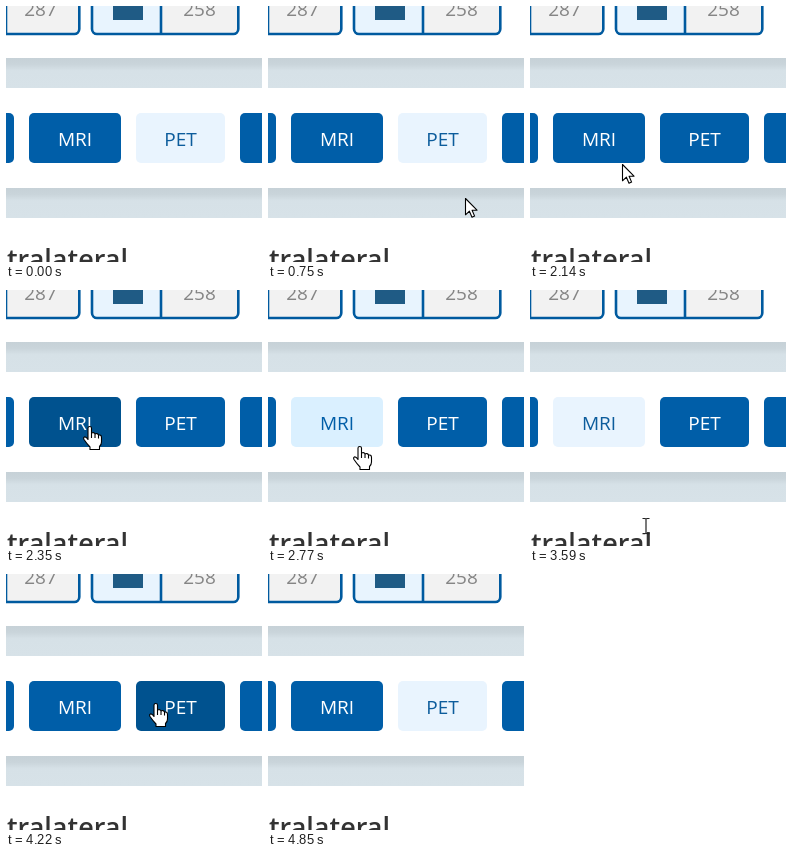
These frames come from a looping animation (256x256 px, 5.62 s). An HTML page:

```html
<!DOCTYPE html>
<html lang="en">
<head>
<meta charset="utf-8">
<title>Filter buttons</title>
<style>
  html, body { margin: 0; width: 100%; height: 100%; overflow: hidden; background: #fff; }
  svg { display: block; width: 100%; height: 100%; }
  text { font-family: "Open Sans", "Noto Sans", sans-serif; font-size: 19px; }
  .mid { text-anchor: middle; }
  .count { fill: #858585; }
  .heading { font-size: 27px; font-weight: 600; fill: #333; text-anchor: end; }
  .edge { fill: none; stroke: #005a9f; stroke-width: 2.6; }
  .cursor { fill: #fff; stroke: #000; stroke-width: 1.1; stroke-linejoin: round; }
</style>
</head>
<body>
<svg viewBox="0 0 256 256">
  <defs>
    <linearGradient id="shade" x1="0" y1="0" x2="0" y2="1">
      <stop offset="0" stop-color="#c6d1d7"/>
      <stop offset=".22" stop-color="#cad5db"/>
      <stop offset=".42" stop-color="#d6e1e7"/>
      <stop offset="1" stop-color="#d7e2e8"/>
    </linearGradient>
  </defs>
  <rect width="256" height="256" fill="#fff"/>
  <rect y="52" width="256" height="30" fill="url(#shade)"/>
  <rect y="182" width="256" height="30" fill="url(#shade)"/>

  <rect x="-74" y="-30" width="147.3" height="58" rx="5" fill="#f2f2f2"/>
  <rect x="-74" y="-30" width="147.3" height="58" rx="5" class="edge"/>
  <path d="M0 0V28" class="edge"/>
  <text x="34.5" y="10" class="mid count">287</text>

  <rect x="86" y="-30" width="146.3" height="58" rx="5" fill="#f2f2f2"/>
  <path d="M155 -30V28H91Q86 28 86 23V-30Z" fill="#e8f4fe"/>
  <rect x="86" y="-30" width="146.3" height="58" rx="5" class="edge"/>
  <path d="M155 0V28" class="edge"/>
  <rect x="107" y="-16" width="30" height="30" fill="#1f5b85"/>
  <text x="193.5" y="10" class="mid count">258</text>

  <rect x="-80" y="107" width="88" height="50" rx="5" fill="#005ea8"/>
  <rect x="234" y="107" width="90" height="50" rx="5" fill="#005ea8"/>
  <g id="mri">
    <rect x="23" y="107" width="92" height="50" rx="5"/>
    <text x="69" y="140" class="mid">MRI</text>
  </g>
  <g id="pet">
    <rect x="130" y="107" width="89" height="50" rx="5"/>
    <text x="174.5" y="140" class="mid">PET</text>
  </g>
  <text x="122" y="263" class="heading">Contralateral</text>

  <path id="arrow" class="cursor" d="M.5 .5V16.8L4.4 13.2L7 19.2L9.6 18.1L7.1 12.2H12Z"/>
  <path id="hand" class="cursor" d="M-2 2Q-2 .5 -.3 .5Q1.5 .5 1.5 2V8Q1.5 6.5 3.3 6.6Q5 6.8 5 8.3Q5.5 7.4 7 7.6Q8.5 8 8.5 9.3Q9.4 8.6 10.6 9.3Q11.5 10 11.5 11.5V16Q11.5 18.5 9.5 20.5V23.5H0V21Q-3 18 -6 13.5Q-7 11.5 -5.5 10.9Q-4 10.5 -2 13.5ZM1.5 8V12M5 8.5V12M8.5 9.5V12.5"/>
  <path id="beam" fill="none" stroke="#222" stroke-width="1.2" d="M-3.5 -7.5H-1L0 -6.7L1 -7.5H3.5M0 -6.7V7M-3.5 7.7H-1L0 7L1 7.7H3.5"/>
</svg>
<script>
const LOOP = 5620;
const $ = id => document.getElementById(id);

// state: [fill, label]
const look = {
  on: ['#005ea8', '#fff'],
  onHover: ['#00528f', '#fff'],
  fade: ['#6da1c7', '#fff'],
  off: ['#e9f4fe', '#0c5c9c'],
  offHover: ['#daf0ff', '#005ea8']
};

const states = {
  mri: [[0, 'on'], [2210, 'onHover'], [2490, 'fade'], [2560, 'offHover'], [2840, 'off'],
        [3870, 'offHover'], [4080, 'fade'], [4150, 'onHover'], [4220, 'on']],
  pet: [[0, 'off'], [890, 'offHover'], [1100, 'onHover'], [1370, 'on'],
        [4220, 'onHover'], [4430, 'fade'], [4500, 'offHover'], [4710, 'off']]
};

// Pointer legs: start, end, step length, keys of [step, x, y]
const legs = [
  [490, 1300, 67.5, [[0, 217, 230], [5, 184, 166], [6, 180, 150], [8, 174, 137]]],
  [1300, 1500, 67, [[0, 172, 162], [2, 170, 226]]],
  [1930, 2700, 70, [[0, 144, 236], [3, 92, 158], [4, 86, 143], [6, 84, 136]]],
  [2700, 3050, 70, [[0, 87, 144], [1, 92, 156], [4, 127, 236]]],
  [3590, 4220, 70, [[0, 116, 236], [3, 94, 160], [4, 89, 146], [7, 90, 134]]],
  [4220, 4640, 70, [[0, 150, 129], [2, 168, 132]]],
  [4640, 4850, 70, [[0, 171, 162], [2, 174, 228]]]
];

function along(keys, step) {
  const n = keys.findIndex(k => k[0] > step);
  if (n < 0) return keys[keys.length - 1].slice(1);
  const a = keys[n - 1], b = keys[n];
  const u = (step - a[0]) / (b[0] - a[0]);
  return [1, 2].map(i => Math.round(a[i] + (b[i] - a[i]) * u));
}

function pointerKind(x, y) {
  if (y < 157) return 'hand';
  return x < 122 && y > 228 ? 'beam' : 'arrow';
}

function draw(t) {
  for (const id in states) {
    const name = states[id].filter(s => s[0] <= t).pop()[1];
    const [box, label] = $(id).children;
    box.setAttribute('fill', look[name][0]);
    label.setAttribute('fill', look[name][1]);
  }
  const leg = legs.find(l => t >= l[0] && t < l[1]);
  const pos = leg && along(leg[3], Math.floor((t - leg[0]) / leg[2]));
  const kind = pos && pointerKind(...pos);
  for (const id of ['arrow', 'hand', 'beam']) {
    $(id).style.display = id === kind ? '' : 'none';
    if (id === kind) $(id).setAttribute('transform', `translate(${pos})`);
  }
}

const start = performance.now();
function tick() {
  draw((performance.now() - start) % LOOP);
  requestAnimationFrame(tick);
}
draw(0);
requestAnimationFrame(tick);
</script>
</body>
</html>
```
